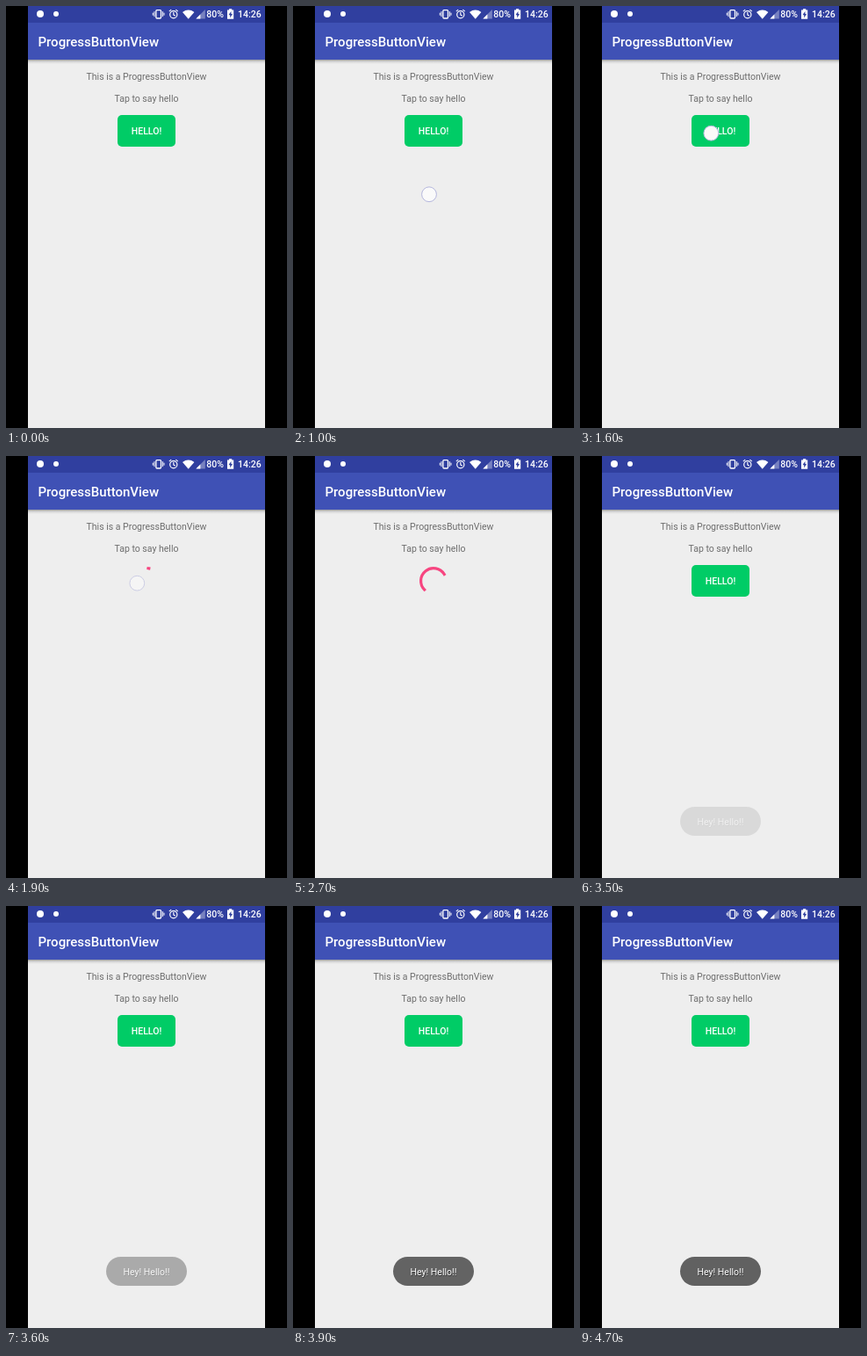
An HTML page that plays this animation: 320x480 px, repeating every 4800 ms.

```html
<!DOCTYPE html>
<html lang="en">
<head>
<meta charset="utf-8">
<title>ProgressButtonView</title>
<style>
  html, body { margin: 0; width: 100%; height: 100%; overflow: hidden; background: #000; }
  svg { display: block; width: 320px; height: 480px; }
  text { font: 400 10.5px Roboto, sans-serif; }
  .medium { font-weight: 500; fill: #fff; }
  .title { font-size: 15px; }
  .body { fill: #6d6d6d; text-anchor: middle; }
  .mid { text-anchor: middle; }
  .line { fill: none; stroke: #fff; }
</style>
</head>
<body>
<svg viewBox="0 0 320 480">
  <defs>
    <linearGradient id="shade" x2="0" y2="1">
      <stop offset="0" stop-color="#000" stop-opacity=".34"/>
      <stop offset=".45" stop-color="#000" stop-opacity=".1"/>
      <stop offset="1" stop-color="#000" stop-opacity="0"/>
    </linearGradient>
  </defs>
  <rect width="320" height="480"/>
  <rect x="25" width="270" height="480" fill="#eee"/>
  <rect x="25" y="61" width="270" height="5" fill="url(#shade)"/>
  <rect x="25" width="270" height="61" fill="#3f51b5"/>
  <rect x="25" width="270" height="19" fill="#303f9f"/>

  <!-- status bar -->
  <g fill="#fff">
    <circle cx="39" cy="9" r="4"/>
    <circle cx="57" cy="9" r="3"/>
    <rect class="line" x="170.9" y="4.6" width="5.6" height="9.4" rx="1" stroke-width="1.3"/>
    <path class="line" d="M169 6.2v6M178.4 6.2v6M167.3 7.7v3M180 7.7v3" stroke-width="1"/>
    <circle class="line" cx="190.8" cy="9.7" r="4.1" stroke-width="1.2"/>
    <path class="line" d="M190.8 7v3l2 1.3M185.8 6.2l2.4-2M195.8 6.2l-2.4-2" stroke-width="1.1"/>
    <path d="M201 6.9Q207.7 2.2 214.4 6.9L207.7 14.7Z"/>
    <path d="M216.4 14.4L226.8 4V14.4Z" fill-opacity=".35"/>
    <path d="M216.4 14.4L221.4 9.4V14.4Z"/>
    <path d="M252 4.6h2v-1.4h3.2v1.4h2v10.1H252Z"/>
    <path d="M256.4 5.9L253.4 10.2h1.8v3.3L258 9.1h-1.6Z" fill="#303f9f"/>
  </g>
  <text class="medium" x="228.3" y="13.2">80%</text>
  <text class="medium" x="264" y="13.2">14:26</text>

  <text class="medium title" x="36.5" y="46">ProgressButtonView</text>
  <text class="body" x="160" y="84">This is a ProgressButtonView</text>
  <text class="body" x="160" y="109">Tap to say hello</text>

  <g id="button">
    <rect x="127" y="124" width="66" height="36" rx="5" fill="#00cc66"/>
    <text class="medium mid" x="160" y="146">HELLO!</text>
  </g>
  <path id="ring" fill="none" stroke="#f74580" stroke-width="3.2" stroke-linecap="square"/>
  <g id="toast">
    <rect x="114" y="399" width="92" height="33" rx="16.5" fill="#616161"/>
    <text class="mid" x="160.5" y="420.5" fill="#000" fill-opacity=".5">Hey! Hello!!</text>
    <text class="mid" x="160" y="419.7" fill="#fff">Hey! Hello!!</text>
  </g>
  <circle id="touch" r="8.4" fill="#fafafa" stroke="#b4b6dd" stroke-width="1"/>
</svg>
<script>
const LOOP = 4800, SPIN_ON = 1855, SPIN_OFF = 3450, TOAST_ON = 3464;
const CYCLE = 1333, TURN = 6665;
const $ = id => document.getElementById(id);
const button = $('button'), ring = $('ring'), toast = $('toast'), touch = $('touch');

const clamp = v => Math.min(1, Math.max(0, v));
const show = (el, on) => el.setAttribute('visibility', on ? 'visible' : 'hidden');
const cubic = (a, b, c, d, s) => {
  const r = 1 - s;
  return a * r * r * r + 3 * b * s * r * r + 3 * c * s * s * r + d * s * s * s;
};

// Solves a Bezier easing running from (x0, 0) to (x3, 1).
function ease(x, x0, x1, x2, x3) {
  if (x <= x0) return 0;
  if (x >= x3) return 1;
  let lo = 0, hi = 1;
  for (let i = 0; i < 24; i++) {
    const s = (lo + hi) / 2;
    if (cubic(x0, x1, x2, x3, s) < x) lo = s; else hi = s;
  }
  return cubic(0, 0, 1, 1, lo);
}

function point(deg) {
  const a = deg * Math.PI / 180;
  return (160 + 14.4 * Math.sin(a)).toFixed(3) + ' ' + (142 - 14.4 * Math.cos(a)).toFixed(3);
}

function drawRing(t) {
  const p = t % CYCLE / CYCLE;
  const base = 720 * t / TURN + 90 * p;
  const from = 270 * ease(p, 0.5, 0.7, 0.6, 1);
  const to = Math.max(from + 0.5, 270 * ease(p, 0, 0.2, 0.1, 0.5));
  const large = to - from > 180 ? 1 : 0;
  ring.setAttribute('d', `M${point(base + from)}A14.4 14.4 0 ${large} 1 ${point(base + to)}`);
}

function drawTouch(t) {
  const u = clamp((t - 850) / 550), k = u * u * (3 - 2 * u);
  touch.setAttribute('cx', 156.3 - 7 * k);
  touch.setAttribute('cy', 230 - 85.3 * k);
  touch.setAttribute('opacity', 1 - clamp((t - 1820) / 200));
  show(touch, t >= 850 && t < 2020);
}

function draw(t) {
  const busy = t >= SPIN_ON && t < SPIN_OFF;
  show(button, !busy);
  show(ring, busy);
  if (busy) drawRing(t - SPIN_ON);
  drawTouch(t);
  const rest = 1 - clamp((t - TOAST_ON) / 500);
  toast.setAttribute('opacity', 1 - rest * rest);
}

const start = performance.now();
function tick(now) {
  draw(Math.max(0, now - start) % LOOP);
  requestAnimationFrame(tick);
}
draw(0);
requestAnimationFrame(tick);
</script>
</body>
</html>
```
